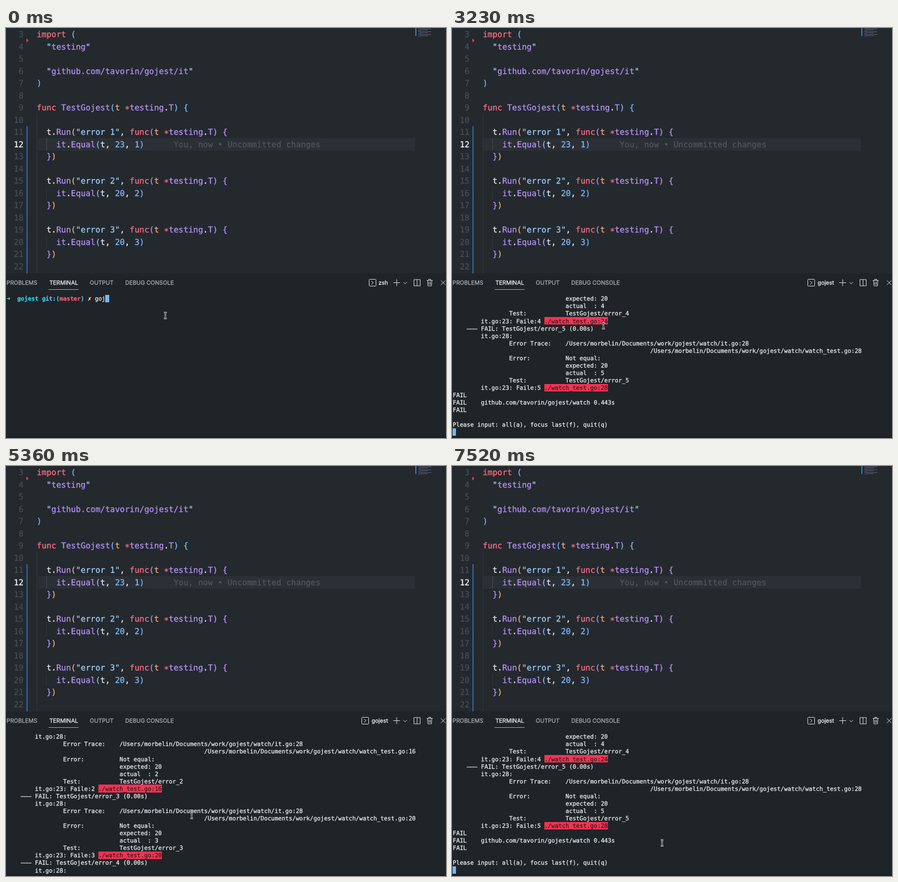
Recreate the animation shown at these times as an HTML page with a canvas. Size 776 by 722 pixels, loop 8000 ms.

```html
<!DOCTYPE html>
<html lang="en">
<head>
<meta charset="utf-8">
<title>Test watcher in an editor terminal</title>
<style>
  html, body { margin: 0; width: 100%; height: 100%; overflow: hidden; background: #1f2428; }
  canvas { display: block; }
</style>
</head>
<body>
<canvas id="stage" width="776" height="722"></canvas>
<script>
const ctx = document.getElementById('stage').getContext('2d');
const LOOP = 8000;
const MONO = '"DejaVu Sans Mono", monospace';
const EDITOR = { x: 54.2, y: 16.2, size: 14.33, pitch: 21.5 };
const TERM = { x: 1.2, y: 480.3, size: 10.33, pitch: 13.07, top: 470, rows: 19 };
const cell = grid => grid.size * 0.602;

// One-letter colour codes used after "~" in marked-up text.
const COLORS = {
  w: '#eef0f2', r: '#ff7085', p: '#b893fc', s: '#9ed0ff', b: '#7cbdff', o: '#ffb070',
  g: '#5fe89d', c: '#2fd6e0', l: '#58c0f5', m: '#ff5a70', y: '#ffea7f', d: '#1f2428', h: '#50565d'
};

function rect(x, y, w, h, color) {
  ctx.fillStyle = color;
  ctx.fillRect(x, y, w, h);
}

function stroke(path, color, width = 1) {
  ctx.strokeStyle = color;
  ctx.lineWidth = width;
  ctx.stroke(new Path2D(path));
}

// A hairline outline gives the text its slightly heavy rendering.
function inkText(text, x, y, color) {
  ctx.fillStyle = ctx.strokeStyle = color;
  ctx.lineWidth = 0.25;
  ctx.fillText(text, x, y);
  ctx.strokeText(text, x, y);
}

function label(text, x, y, color, align = 'left') {
  ctx.font = '10px Inter, sans-serif';
  ctx.textAlign = align;
  inkText(text, x, y, color);
  ctx.textAlign = 'left';
}

// Draws marked-up text on a grid of monospaced cells.
function drawLine(grid, row, markup, col = 0, weight = 'normal') {
  ctx.font = `${weight} ${grid.size}px ${MONO}`;
  for (const part of markup.split('~').slice(1)) {
    for (const char of part.slice(1)) {
      inkText(char, grid.x + col++ * cell(grid), grid.y + row * grid.pitch, COLORS[part[0]]);
    }
  }
}

// Fills terminal cells, aligned to whole pixels.
function fillCells(row, col, count, color) {
  const edge = n => Math.round(TERM.top + n * TERM.pitch);
  const left = Math.round(TERM.x + col * cell(TERM));
  const right = Math.round(TERM.x + (col + count) * cell(TERM));
  rect(left, edge(row), right - left, edge(row + 1) - edge(row), color);
}

const testCase = (n, value) => [
  '',
  `~w  t.~pRun~o(~s"error ${n}"~w, ~rfunc~p(~ot ~r∗~ptesting~w.~pT) {`,
  `~w    ~pit~w.~pEqual~b(~wt, ~b${value}~w, ~b${n})`,
  '~w  ~p}~o)'
];
const code = [
  '~rimport ~b(',
  '~w  ~s"~ptesting~s"',
  '',
  '~w  ~s"~pgithub.com/tavorin/gojest/it~s"',
  '~b)',
  '',
  '~rfunc ~pTestGojest~b(~ot ~r∗~ptesting~w.~pT~b) {',
  ...testCase(1, 23), ...testCase(2, 20), ...testCase(3, 20), ''
];

const HOME = '/Users/morbelin/Documents/work/gojest/watch/';
const field = (name, value) => ' '.repeat(16) + name.padEnd(16) + value;

function failure(n) {
  const line = 8 + 4 * n;
  return [
    `    ——— FAIL: TestGojest/error_${n} (0.00s)`,
    '        it.go:28:',
    field('Error Trace:', HOME + 'it.go:28'),
    ' '.repeat(56) + HOME + 'watch_test.go:' + line,
    field('Error:', 'Not equal:'),
    field('', 'expected: ' + (n === 1 ? 23 : 20)),
    field('', 'actual  : ' + n),
    field('Test:', 'TestGojest/error_' + n),
    `        it.go:23: Faile:${n} ~d./watch_test.go:${line}`
  ];
}
const output = [
  ...[1, 2, 3, 4, 5].flatMap(failure),
  'FAIL', 'FAIL    github.com/tavorin/gojest/watch 0.443s', 'FAIL',
  '', 'Please input: all(a), focus last(f), quit(q)', ''
].map(line => '~w' + line);

// Value of the last [time, value] pair already reached.
const latest = (steps, t) => steps.filter(([time]) => time <= t).pop()[1];

const TYPED = [[0, 'goj'], [90, 'goje'], [360, 'gojes'], [710, 'gojest']];
const SCROLL = [
  [2960, 32], [4820, 16], [4910, 1], [5360, 10], [5810, 16],
  [5900, 20], [6170, 25], [6260, 29], [6620, 32]
];

function drawEditor() {
  const { y, pitch } = EDITOR;
  const lineTop = row => Math.round(y - 16 + row * pitch);
  rect(0, 0, 776, 432, '#24292e');
  rect(54, 194, 667, 22, '#2b3036');
  rect(54, lineTop(7), 1, 432 - lineTop(7), '#2f363d');
  for (const row of [9, 13, 17]) {
    rect(71, lineTop(row), 1, pitch, row === 9 ? '#444d56' : '#2f363d');
  }

  for (let py = 173; py < 432; py += 2) {
    rect(36, py, 1, 1, '#3596ee');
    rect(37, py + 1, 1, 1, '#3596ee');
    rect(37, py, 1, 1, '#28557d');
  }
  ctx.fillStyle = '#f8405c';
  ctx.fill(new Path2D('M36 18.5 39.5 22 36 25.5Z'));

  code.forEach((line, row) => {
    const number = String(row + 3);
    ctx.font = `${EDITOR.size}px ${MONO}`;
    ctx.textAlign = 'right';
    inkText(number, 31, y + row * pitch, number === '12' ? '#f3f5f7' : '#444d56');
    ctx.textAlign = 'left';
    drawLine(EDITOR, row, line);
  });
  drawLine(EDITOR, 9, '~hYou, now • Uncommitted changes', 28);

  rect(722, 0, 1.5, 14, '#3596ee');
  for (let py = 0; py < 13; py += 5) {
    rect(727, py + 1, 23, 1, '#5d5a76');
    rect(730, py + 3, 14, 1, '#555670');
    rect(727, py + 4, 4, 1, '#5b5064');
  }
}

function drawPanel(t) {
  rect(0, 432, 776, 290, '#1f2428');
  rect(0, 719, 776, 3, '#1a1e22');
  const muted = '#a8afb6', bright = '#f0f2f4', icon = '#d3d7db';
  label('PROBLEMS', 1, 452, muted);
  label('TERMINAL', 76.5, 452, bright);
  label('OUTPUT', 147.8, 452, muted);
  label('DEBUG CONSOLE', 210.3, 452, muted);
  rect(75, 460, 53, 1, '#f9826c');

  const shell = t < 2420 ? 'zsh' : 'gojest';
  const left = t < 2420 ? 640.5 : 627.5;
  label(shell, 673.7, 452, bright, 'right');
  stroke(`M${left + 1} 442.5h10q1 0 1 1v10q0 1-1 1h-10q-1 0-1-1v-10q0-1 1-1z
    M${left + 4} 445.5l3.5 3-3.5 3`, icon);
  stroke('M683 448.5h12M689 442.5v12 M701 447.5l3 3 3-3', icon);
  stroke('M719.5 443h11v11h-11zM725 443v11', icon);
  stroke('M742 444.5h10.5M745.5 444v-1.5h3.5v1.5M743.5 445l.6 9h6.3l.6-9M746 447v5M748.5 447v5', icon);
  stroke('M767 444.5l8 8M775 444.5l-8 8', icon);
}

const drawCaret = (row, col) => fillCells(row, col, 1, '#74b8fa');

function drawTerminal(t) {
  if (t < 2240) {
    const typed = latest(TYPED, t);
    drawLine(TERM, 0, '~g➜  ~cgojest ~lgit:(~mmaster~l) ~y✗', 0, 'bold');
    drawLine(TERM, 0, '~w' + typed, 25);
    drawCaret(0, 25 + typed.length);
  } else if (t < 2960) {
    drawLine(TERM, 0, '~wrun all ...');
    drawCaret(1, 0);
  } else {
    const first = latest(SCROLL, t);
    output.slice(first, first + TERM.rows).forEach((line, row) => {
      if (line.includes('~d')) fillCells(row, 26, 18, '#ff3052');
      drawLine(TERM, row, line);
    });
    const caretRow = output.length - 1 - first;
    if (caretRow < TERM.rows) drawCaret(caretRow, 0);
  }
}

// Pointer path as [step, x, y]; it advances in steps of 88.5 ms.
const PATH = [
  [-1, 281, 506], [1, 267, 524], [5, 318, 592],
  [9, 404, 641], [14, 373, 635.5], [17, 327.5, 615]
];

function pointerAt(t) {
  if (t >= 7520) return [370.5, 663.5];
  if (t >= 7430) return [350, 641];
  const step = Math.max(-1, Math.min(17, Math.floor((t - 3140) / 88.5)));
  const next = Math.max(1, PATH.findIndex(([s]) => s >= step));
  const [s0, x0, y0] = PATH[next - 1];
  const [s1, x1, y1] = PATH[next];
  const k = (step - s0) / (s1 - s0);
  return [x0 + (x1 - x0) * k, y0 + (y1 - y0) * k];
}

function drawPointer(t) {
  const beam = 'M-2.5-5Q0-5 0-3Q0-5 2.5-5M0-3V3.5M-2.5 5.5Q0 5.5 0 3.5Q0 5.5 2.5 5.5M-1.5 1.5H1.5';
  ctx.save();
  ctx.translate(...pointerAt(t));
  stroke(beam, '#e2e4e6', 2.4);
  stroke(beam, '#15181b', 0.9);
  ctx.restore();
}

function render(now) {
  const t = now % LOOP;
  drawEditor();
  drawPanel(t);
  drawTerminal(t);
  drawPointer(t);
}

ctx.textRendering = 'geometricPrecision';
const start = performance.now();
function tick() {
  render(performance.now() - start);
  requestAnimationFrame(tick);
}
tick();
</script>
</body>
</html>
```
